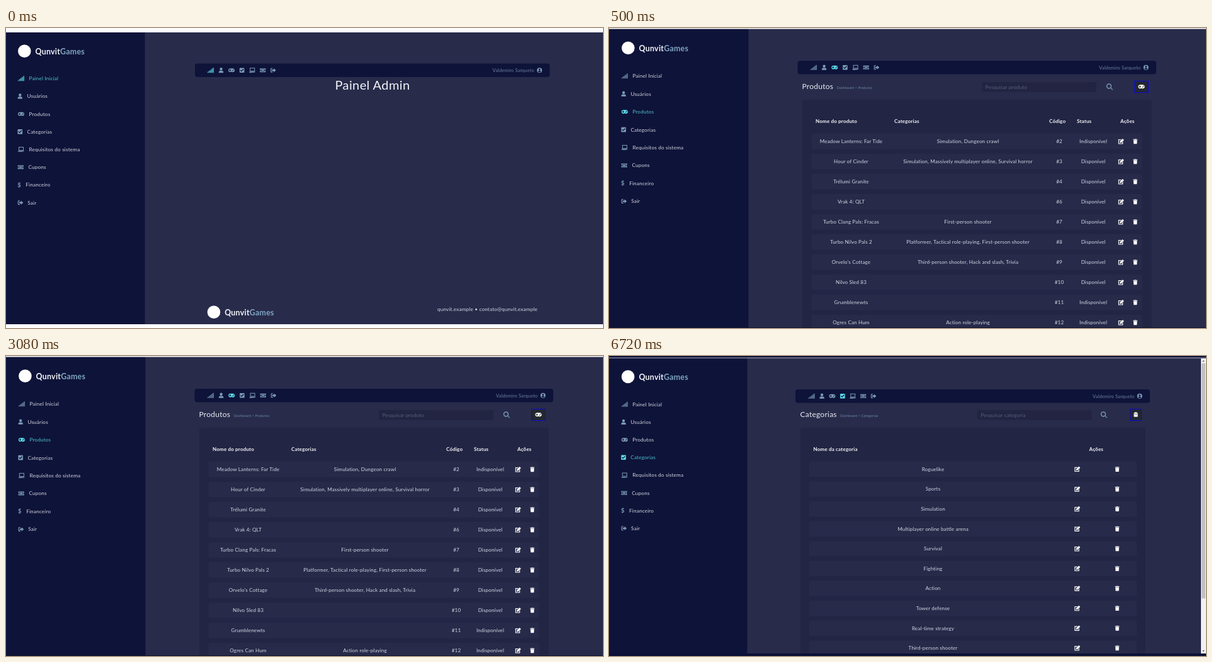
Animation, 948 px wide and 477 px high, one loop 8 s. Source, as an HTML page:

```html
<!DOCTYPE html>
<html lang="pt-BR">
<head>
<meta charset="utf-8">
<title>Painel</title>
<style>
  html, body { margin: 0; width: 100%; height: 100%; overflow: hidden; background: #282b4a; }
  svg { display: block; width: 100%; height: 100%; }
  text { font-family: Lato, "Open Sans", sans-serif; letter-spacing: .02em; white-space: pre; }
</style>
</head>
<body>
<svg id="stage" viewBox="0 0 948 477"></svg>
<script>
const color = {
  main: '#282b4a', side: '#0e1339', panel: '#232544', row: '#282a4a', field: '#222442',
  text: '#d3d7e2', white: '#fff', muted: '#7c9bb6', name: '#6c7f9f',
  active: '#5bdcea', activeText: '#50c3cf', hint: '#5a5f7a'
};

// Icons are centred on the origin in a box about ten units wide.
const bars = [0, 1, 2, 3, 4].map(i => `M${-4.9 + i * 2.1} 4v${-1.6 - i * 1.6}h1.3V4z`).join('');
const icons = {
  signal: bars,
  user: 'M0-4.2a2.2 2.2 0 0 1 0 4.4a2.2 2.2 0 0 1 0-4.4zM-3.7 4V3Q-3.7.7-1.5.7H1.5Q3.7.7 3.7 3V4z',
  gamepad: 'M-2-3H2A3 3 0 0 1 2 3Q1 3 0 2.4Q-1 3-2 3A3 3 0 0 1-2-3z' +
    'M-2.9-1.6v1.1H-4v1h1.1v1.1h1V.5h1.1v-1h-1.1v-1.1zM1.3 0h1.3v1.3H1.3zM2.7-1.5H4v1.3H2.7z',
  check: 'M-3-3.8H3Q3.8-3.8 3.8-3V3Q3.8 3.8 3 3.8H-3Q-3.8 3.8-3.8 3V-3Q-3.8-3.8-3-3.8z' +
    'M-2.9.2L-.8 2.3L3-1.5L2.1-2.4L-.8.5L-2-.7z',
  laptop: 'M-4-4H4V1.8H-4zM-3-3V.9H3V-3zM-5 2.4H5Q5 4-4 4H-4Q-5 4-5 2.4z',
  ticket: 'M-4.6-3H4.6V-1A1 1 0 0 0 4.6 1V3H-4.6V1A1 1 0 0 0-4.6-1zM-3-1.8V1.8H3V-1.8zM-2.2-1.1H2.2V1.1H-2.2z',
  exit: 'M-1-3.5H-3Q-4.2-3.5-4.2-2.3V2.3Q-4.2 3.5-3 3.5H-1V2.4H-3V-2.4H-1zM-2-1.2H.8V-3.2L4.3 0L.8 3.2V1.2H-2z',
  avatar: 'M0-4a4 4 0 0 1 0 8a4 4 0 0 1 0-8zM0-2.6a1.5 1.5 0 0 0 0 3a1.5 1.5 0 0 0 0-3zM-2.6 2Q0 4.4 2.6 2Q1.6.8 0 .8T-2.6 2z',
  search: 'M-1-5a4 4 0 0 1 3.2 6.4L5 4.2L4.2 5L1.4 2.2A4 4 0 1 1-1-5zM-1-3.6a2.6 2.6 0 0 0 0 5.2a2.6 2.6 0 0 0 0-5.2z',
  edit: 'M-4-3.3H.8L-.4-2.1H-3.1V3H2V1.1L3.2-.1V4.1H-4.2V-3.3zM-2 2L-1.7-.1L2.6-4.4L4.8-2.2L.5 1.8z',
  trash: 'M-3.5-3.6H-1.2L-.8-4.2H.8L1.2-3.6H3.5V-2.6H-3.5zM-3-2.1H3L2.6 4H-2.6z',
  ghost: 'M-3 3.6V-1A3 3 0 0 1 3-1V3.6L2 2.9L1 3.8L0 2.9L-1 3.8L-2 2.9zM-1.7-1.5V-.3H-.5V-1.5zM.5-1.5V-.3H1.7V-1.5z'
};

const rect = (x, y, w, h, fill, r = 0, extra = '') =>
  `<rect x="${x}" y="${y}" width="${w}" height="${h}" rx="${r}" fill="${fill}" ${extra}/>`;
// y is the middle of the capitals.
const text = (x, y, label, { size = 8.05, fill = color.text, anchor = 'start', weight = 400 } = {}) =>
  `<text x="${x}" y="${y + size * .355}" font-size="${size}" fill="${fill}" text-anchor="${anchor}" font-weight="${weight}">${label}</text>`;
const icon = (name, x, y, fill = color.muted, scale = 1) =>
  `<path d="${icons[name]}" transform="translate(${x} ${y}) scale(${scale})" fill="${fill}" fill-rule="evenodd"/>`;

const brand = (x, y) => `<circle cx="${x}" cy="${y}" r="10.3" fill="#fff"/>` +
  text(x + 17.2, y + .6, 'Qunvit<tspan fill="#7fa5c4">Games</tspan>', { size: 12.4, fill: '#f2f4f8', weight: 700 });

const menu = [
  ['signal', 24, 36.5, 'Painel Inicial'], ['user', 22.3, 33.5, 'Usuários'],
  ['gamepad', 24, 36.5, 'Produtos'], ['check', 22.3, 33.5, 'Categorias'],
  ['laptop', 24, 36.5, 'Requisitos do sistema'], ['ticket', 23.3, 35.5, 'Cupons'],
  ['dollar', 21, 31.3, 'Financeiro'], ['exit', 23, 34.3, 'Sair']
];

function sidebar({ width, dx, y, step, active }) {
  return rect(0, 0, width, 477, color.side) + menu.map(([name, ix, tx, label], i) => {
    const cy = y + i * step, on = i === active;
    const mark = name === 'dollar'
      ? text(ix + dx, cy, '$', { size: 9.5, fill: color.muted, anchor: 'middle', weight: 700 })
      : icon(name, ix + dx, cy, on ? color.active : color.muted);
    return mark + text(tx + dx, cy, label, { size: 8.2, fill: on ? color.activeText : color.text });
  }).join('');
}

function navbar({ x, y, width, first, step, active }) {
  const cy = y + 10.7, right = x + width;
  return rect(x, y, width, 21.6, color.side, 4) +
    menu.filter(m => m[0] !== 'dollar')
      .map(([name], i) => icon(name, first + i * step, cy, i === active ? color.active : color.muted)).join('') +
    text(right - 24.7, cy + .3, 'Valdemiro Sarqueto', { size: 7.4, fill: color.name, anchor: 'end' }) +
    icon('avatar', right - 16.3, cy, color.muted);
}

function toolbar({ x, title, hint, crumbX, fieldX, hintX, searchX, button, buttonIcon }) {
  const [bx, by, bw, bh] = button;
  return text(x, 93, title, { size: 12, fill: '#eceef4' }) +
    text(crumbX, 95.5, `Dashboard &gt; ${title}`, { size: 5.5, fill: '#6c87a8' }) +
    rect(fieldX, 86, 182, 15.5, color.field, 2) +
    text(hintX, 94, hint, { fill: color.hint }) +
    icon('search', searchX, 93.5, color.muted, 1.05) +
    rect(bx, by, bw, bh, '#23272f', 0, 'stroke="#0a0ad4"') +
    icon(buttonIcon, bx + bw / 2, 93.3, color.white, 1.02);
}

const heading = (x, label) => text(x, 148, label, { fill: '#f4f5f9', weight: 700 });
const cell = (x, y, label) => text(x, y, label, { anchor: 'middle' });
const actions = (y, editX, trashX) => icon('edit', editX, y, color.white) + icon('trash', trashX, y, color.white, .98);

const products = [
  ['Meadow Lanterns: Far Tide', 'Simulation, Dungeon crawl', 2, false],
  ['Hour of Cinder', 'Simulation, Massively multiplayer online, Survival horror', 3, true],
  ['Trélumi Granite', '', 4, true],
  ['Vrak 4: QLT', '', 6, true],
  ['Turbo Clang Pals: Fracas', 'First-person shooter', 7, true],
  ['Turbo Nilvo Pals 2', 'Platformer, Tactical role-playing, First-person shooter', 8, true],
  ["Orvelo's Cottage", 'Third-person shooter, Hack and slash, Trivia', 9, true],
  ['Nilvo Sled 83', '', 10, true],
  ['Grumblenewts', '', 11, false],
  ['Ogres Can Hum', 'Action role-playing', 12, false]
];
const categories = ['Roguelike', 'Sports', 'Simulation', 'Multiplayer online battle arena', 'Survival',
  'Fighting', 'Action', 'Tower defense', 'Real-time strategy', 'Third-person shooter'];

const home = () =>
  sidebar({ width: 220.5, dx: 0, y: 80.3, step: 28.2, active: 0 }) + brand(29.3, 36.7) +
  navbar({ x: 300, y: 56.5, width: 563.5, first: 325, step: 16.55, active: 0 }) +
  text(582, 90.5, 'Painel Admin', { size: 20, fill: '#f2f3f7', anchor: 'middle' }) +
  brand(330, 451.7) +
  text(764.5, 447.5, 'qunvit.example • contato@qunvit.example', { size: 8.2, anchor: 'middle' }) +
  rect(0, 0, 948, 7, '#fcfcfd') + rect(0, 471, 948, 6, '#fff');

const productPage = () =>
  sidebar({ width: 221.5, dx: .9, y: 76.3, step: 28.45, active: 2 }) + brand(30.4, 31.8) +
  navbar({ x: 299.5, y: 52, width: 569.5, first: 325, step: 16.65, active: 2 }) +
  toolbar({ x: 306.5, title: 'Produtos', hint: 'Pesquisar produto', crumbX: 362, fieldX: 592, hintX: 597.5,
    searchX: 795, button: [834.5, 84.5, 22, 18], buttonIcon: 'gamepad' }) +
  rect(307, 114, 554.5, 370, color.panel, 4) +
  heading(328, 'Nome do produto') + heading(453, 'Categorias') + heading(699, 'Código') +
  heading(743, 'Status') + heading(812, 'Ações') +
  products.map(([name, genres, code, available], i) => {
    const y = 180.4 + i * 32;
    return rect(321.5, y - 12.4, 525, 24.8, color.row, 2) + cell(384.5, y, name) + cell(570, y, genres) +
      cell(715, y, '#' + code) + cell(769, y, available ? 'Disponível' : 'Indisponível') + actions(y, 813, 835.7);
  }).join('') +
  rect(0, 0, 948, 1.6, '#f0f1f4') + rect(0, 476, 948, 1, '#101326');

const scrollbar = () =>
  rect(940, 4, 8, 469, '#f1f1f1') + rect(941, 11.5, 6, 374, '#c1c1c1') +
  '<path d="M942.2 9l1.8-2.2L945.8 9zM942.2 468l1.8 2.2L945.8 468z" fill="#606060"/>';

const categoryPage = () =>
  sidebar({ width: 219.5, dx: .8, y: 76.8, step: 28.17, active: 3 }) + brand(30.2, 32.9) +
  navbar({ x: 296, y: 53, width: 563, first: 321.7, step: 16.4, active: 3 }) +
  toolbar({ x: 303.5, title: 'Categorias', hint: 'Pesquisar categoria', crumbX: 367, fieldX: 584.5, hintX: 590.5,
    searchX: 786, button: [827.5, 84.5, 18, 18], buttonIcon: 'ghost' }) +
  rect(304, 114, 548, 370, color.panel, 4) +
  heading(324.5, 'Nome da categoria') + heading(762.5, 'Ações') +
  categories.map((name, i) => {
    const y = 180 + i * 31.6;
    return rect(318, y - 12.2, 520, 24.4, color.row, 2) + cell(514.5, y, name) + actions(y, 743.5, 807);
  }).join('') +
  scrollbar() +
  rect(0, 0, 948, 2.5, '#0b1036') + rect(0, 2.5, 948, 1, '#b4b8c8') + rect(0, 473, 948, 4, '#0b1036');

const scenes = [[0, home], [500, productPage], [4800, categoryPage]];
const loop = 8000;
const stage = document.getElementById('stage');
stage.innerHTML = scenes.map(([, draw]) => `<g>${rect(0, 0, 948, 477, color.main)}${draw()}</g>`).join('');
const layers = [...stage.children];

const start = performance.now();
function tick() {
  const time = (performance.now() - start) % loop;
  const current = scenes.filter(([from]) => time >= from).length - 1;
  layers.forEach((layer, i) => layer.style.display = i === current ? '' : 'none');
  requestAnimationFrame(tick);
}
tick();
</script>
</body>
</html>
```
